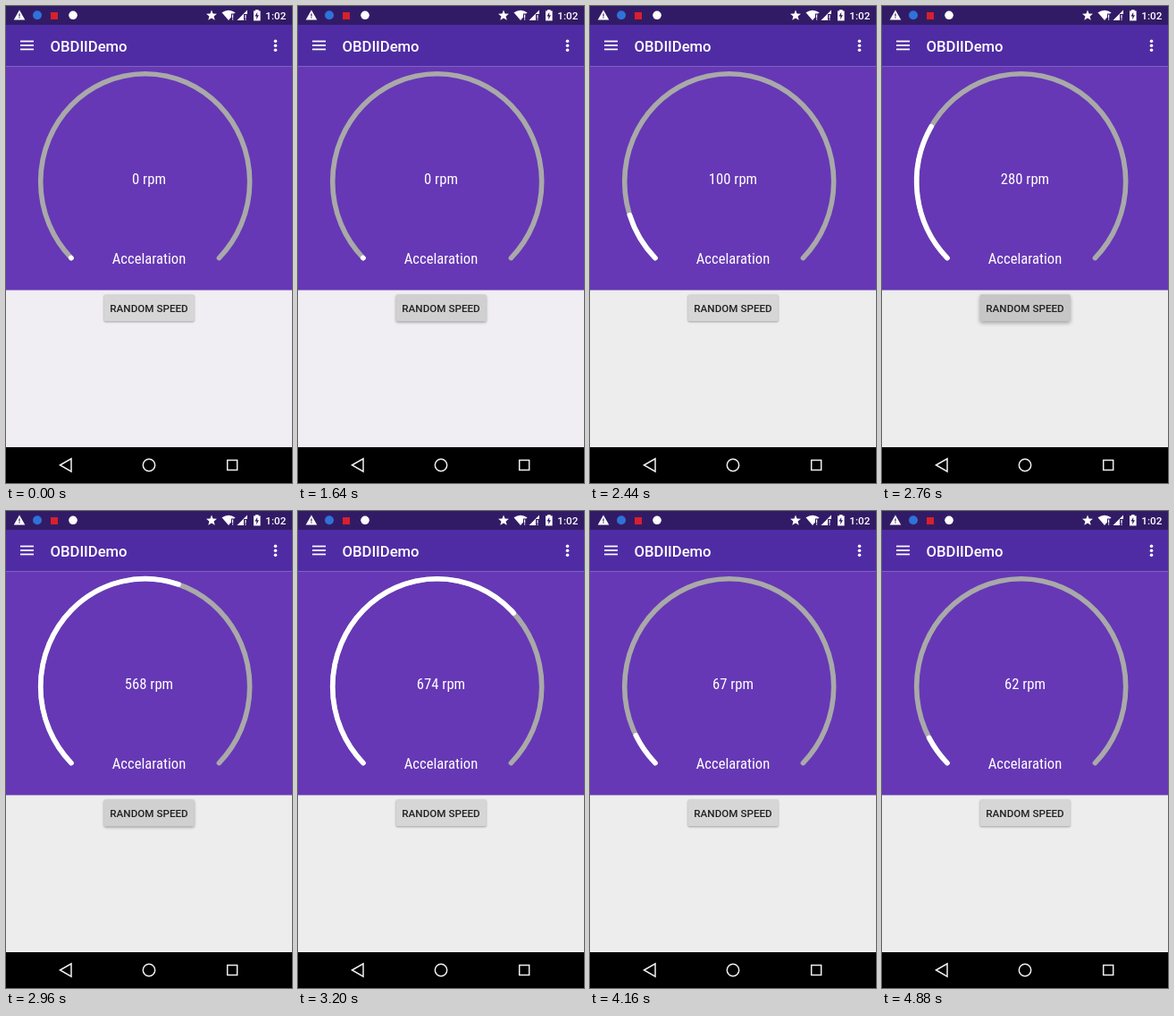
These frames come from a looping animation (320 px wide and 533 px high, 4.92 s). An HTML page with a canvas:

```html
<!DOCTYPE html>
<html lang="en">
<head>
<meta charset="utf-8">
<title>OBDIIDemo</title>
<style>
  html, body { margin: 0; width: 100%; height: 100%; overflow: hidden; background: #000; }
  canvas { display: block; width: 320px; height: 533px; }
</style>
</head>
<body>
<canvas id="stage"></canvas>
<script>
const W = 320, H = 533, LOOP = 4920, STEP = 40;
const canvas = document.getElementById('stage');
const ctx = canvas.getContext('2d');
const ratio = window.devicePixelRatio || 1;
canvas.width = W * ratio;
canvas.height = H * ratio;

const SWEEP = 500;
const runs = [
  { press: 1640, start: 1724, from: 0, to: 100 },
  { press: 2640, start: 2674, from: 100, to: 674 },
  { press: 3640, start: 3706, from: 674, to: 62 }
];
const gauge = { x: 155.7, y: 196.3, rx: 117, ry: 120.6 };

const clamp = v => Math.max(0, Math.min(1, v));
const decelerate = t => 1 - (1 - t) ** 2;

function speedAt(t) {
  let speed = 0;
  for (const r of runs) {
    if (t >= r.start) speed = r.from + (r.to - r.from) * decelerate(clamp((t - r.start) / SWEEP));
  }
  return speed;
}

// 0 = resting, 1 = fully pressed
function pressAt(t) {
  let amount = 0;
  for (const { press } of runs) {
    const d = t - press;
    if (d >= 0) amount = Math.max(amount, clamp((d + 40) / 100) * clamp((450 - d) / 330));
  }
  return amount;
}

function rect(x, y, w, h, color) {
  ctx.fillStyle = color;
  ctx.fillRect(x, y, w, h);
}

function disc(x, y, r, color) {
  ctx.fillStyle = color;
  ctx.beginPath();
  ctx.arc(x, y, r, 0, 7);
  ctx.fill();
}

function poly(points, color) {
  ctx.fillStyle = color;
  ctx.beginPath();
  points.forEach(([x, y]) => ctx.lineTo(x, y));
  ctx.closePath();
  ctx.fill();
}

function text(str, x, y, font, color, align = 'center') {
  ctx.font = font + ' "Roboto Condensed", Roboto, sans-serif';
  if (!font.startsWith('condensed')) ctx.font = font + ' Roboto, sans-serif';
  ctx.fillStyle = color;
  ctx.textAlign = align;
  ctx.fillText(str, x, y);
}

function bang(x, y, h, color) {
  rect(x - 0.6, y, 1.2, h, color);
  rect(x - 0.6, y + h + 0.8, 1.2, 1.2, color);
}

function statusBar() {
  const bar = '#321b66';
  rect(0, 0, W, 21, bar);
  poly([[15, 4.5], [21.3, 15.5], [8.7, 15.5]], '#fff');
  bang(15, 8.5, 3, bar);
  disc(35, 10.3, 5, '#2f72d8');
  rect(50, 7, 8, 8, '#d8202c');
  disc(75, 10.3, 4.8, '#fff');

  const star = [];
  for (let i = 0; i < 10; i++) {
    const a = i * Math.PI / 5 - Math.PI / 2, r = i % 2 ? 2.7 : 6.3;
    star.push([230 + r * Math.cos(a), 10.7 + r * Math.sin(a)]);
  }
  poly(star, '#fff');

  ctx.fillStyle = '#fff';
  ctx.beginPath();
  ctx.moveTo(249, 16);
  ctx.lineTo(241.5, 7.2);
  ctx.quadraticCurveTo(249, 2.2, 256.5, 7.2);
  ctx.fill();
  rect(252, 8.5, 4, 8, bar);
  bang(253.6, 9.5, 4, '#fff');

  poly([[270, 4.5], [270, 16], [258.5, 16]], '#fff');
  rect(266, 9, 4, 7.5, bar);
  bang(268, 10, 3.8, '#fff');

  rect(279, 4.2, 3.6, 2, '#fff');
  rect(277, 5.4, 7.6, 11, '#fff');
  poly([[281.3, 6.7], [278.5, 11.5], [280.4, 11.5], [280.1, 15.2], [283, 10.2], [281.1, 10.2]], bar);
  text('1:02', 313.3, 14.8, '500 11.67px', '#fff', 'right');
}

function toolbar() {
  rect(0, 21, W, 46.5, '#4f2ca4');
  for (let i = 0; i < 3; i++) {
    rect(16, 38.6 + i * 4.5, 15, 1.7, '#fff');
    disc(301.5, 39.3 + i * 5, 1.8, '#fff');
  }
  text('OBDIIDemo', 49.5, 50.5, '500 16.67px', '#fff', 'left');
}

function arc(share, color) {
  const a = Math.PI * 0.75;
  ctx.strokeStyle = color;
  ctx.lineWidth = 5.6;
  ctx.lineCap = 'round';
  ctx.beginPath();
  ctx.ellipse(gauge.x, gauge.y, gauge.rx, gauge.ry, 0, a, a + Math.max(share, 0.0005) * Math.PI * 1.5);
  ctx.stroke();
}

function dial(speed) {
  rect(0, 67.5, W, 250, '#6638b5');
  arc(1, '#a9a9a9');
  arc(speed / 1000, '#fff');
  text(Math.floor(speed + 1e-6) + ' rpm', 160, 199, 'condensed 16.67px', '#fff');
  text('Accelaration', 160, 288, 'condensed 16.67px', '#fff');
}

function button(press) {
  const shade = Math.round(214 - 16 * press);
  ctx.save();
  ctx.shadowColor = 'rgba(0,0,0,0.32)';
  ctx.shadowBlur = (2 + 2.5 * press) * ratio;
  ctx.shadowOffsetY = (1 + press) * ratio;
  ctx.fillStyle = `rgb(${shade},${shade},${shade})`;
  ctx.beginPath();
  ctx.roundRect(109.5, 322.3, 101.3, 30, 1.8);
  ctx.fill();
  ctx.restore();
  text('RANDOM SPEED', 160, 342, '500 11.67px', '#212121');
}

function navBar() {
  rect(0, 493, W, 40, '#000');
  ctx.strokeStyle = '#f0f0f0';
  ctx.lineWidth = 1.5;
  ctx.lineCap = 'butt';
  ctx.beginPath();
  ctx.moveTo(60.5, 513);
  ctx.lineTo(73, 505.8);
  ctx.lineTo(73, 520.2);
  ctx.closePath();
  ctx.moveTo(166.7, 513);
  ctx.arc(160, 513, 6.7, 0, Math.PI * 2);
  ctx.rect(247.7, 507.5, 11, 11);
  ctx.stroke();
}

function draw(t) {
  ctx.setTransform(ratio, 0, 0, ratio, 0, 0);
  rect(0, 0, W, H, t < 1680 ? '#f1eef3' : '#ededed');
  statusBar();
  toolbar();
  dial(speedAt(t));
  button(pressAt(t));
  navBar();
}

const begin = performance.now();
function tick() {
  const t = (performance.now() - begin) % LOOP;
  draw(Math.floor(t / STEP) * STEP);
  requestAnimationFrame(tick);
}
tick();
</script>
</body>
</html>
```
